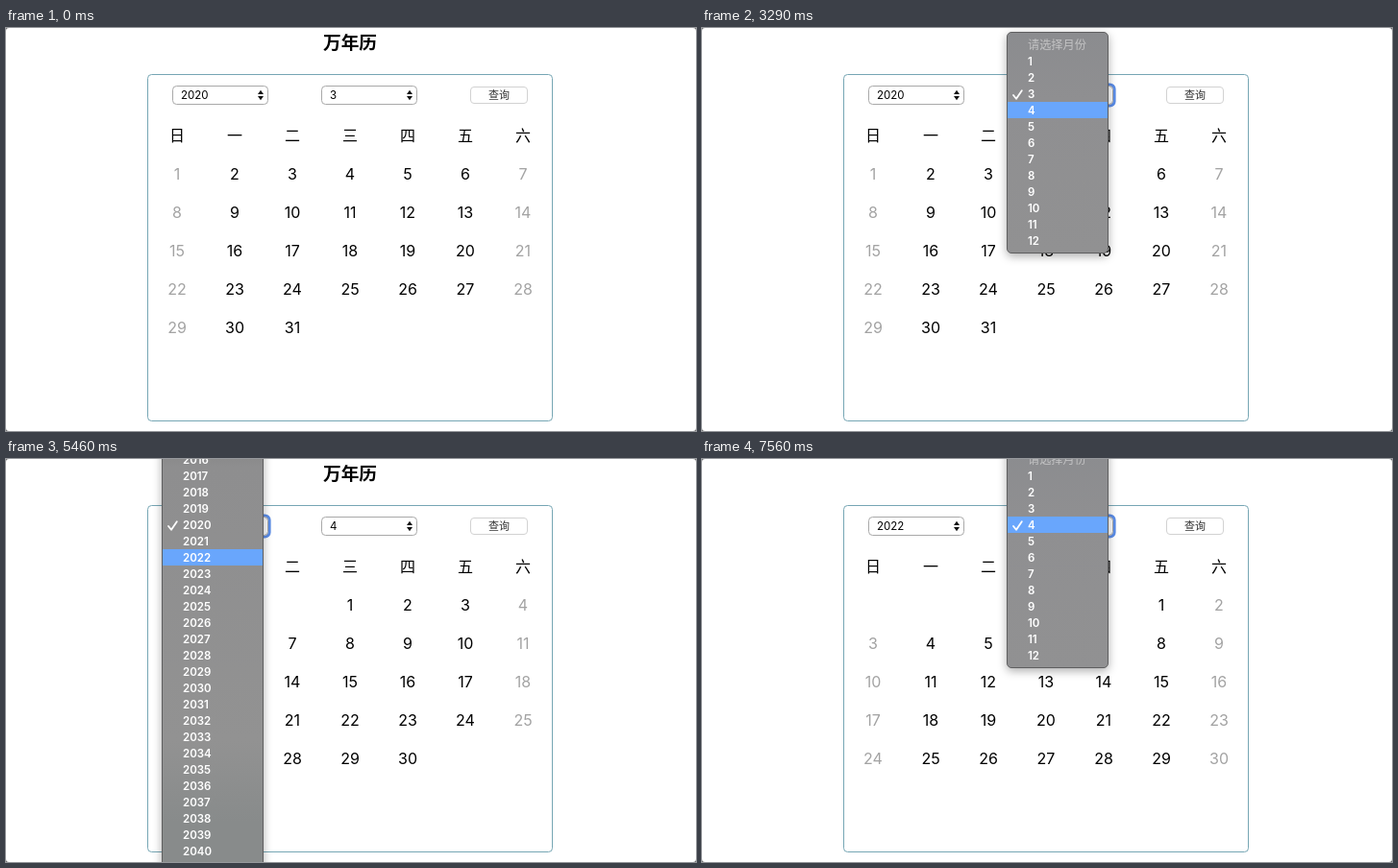
These frames come from a looping animation (718 by 420 pixels, 8000 ms). An HTML page:

```html
<!DOCTYPE html>
<html lang="zh">
<head>
<meta charset="utf-8">
<title>万年历</title>
<style>
  html, body { margin: 0; width: 100%; height: 100%; overflow: hidden; background: #fff; }
  svg { display: block; width: 718px; height: 420px; }
  text { font-family: Inter, "Noto Sans CJK SC", "Noto Sans CJK", sans-serif; white-space: pre; }
  .mid { text-anchor: middle; }
  .shadow { filter: drop-shadow(0 3px 5px rgba(0, 0, 0, .32)); }
</style>
</head>
<body>
<svg id="stage" viewBox="0 0 718 420">
  <defs>
    <linearGradient id="monthFill" x1="0" y1="0" x2="0" y2="1">
      <stop offset="0" stop-color="#8b8c8f"/><stop offset=".3" stop-color="#8f8f91"/><stop offset="1" stop-color="#919192"/>
    </linearGradient>
    <linearGradient id="yearFill" gradientUnits="userSpaceOnUse" x1="0" y1="0" x2="0" y2="420">
      <stop offset="0" stop-color="#7c7c7c"/><stop offset=".12" stop-color="#8e8e8f"/>
      <stop offset=".8" stop-color="#929292"/><stop offset="1" stop-color="#888b8b"/>
    </linearGradient>
    <linearGradient id="pressFill" x1="0" y1="0" x2="0" y2="1">
      <stop offset="0" stop-color="#64a9f8"/><stop offset="1" stop-color="#1f70f0"/>
    </linearGradient>
    <filter id="soft" x="-10%" y="-50%" width="120%" height="200%"><feGaussianBlur stdDeviation=".7"/></filter>
  </defs>
</svg>
<script>
const LOOP = 8000, ROW = 17, SELECTED_TOP = 60;
const stage = document.getElementById('stage');

function add(parent, tag, attrs, content) {
  const node = document.createElementNS('http://www.w3.org/2000/svg', tag);
  for (const key in attrs) node.setAttribute(key, attrs[key]);
  if (content !== undefined) node.textContent = content;
  parent.appendChild(node);
  return node;
}
const show = (node, on) => node.setAttribute('visibility', on ? 'visible' : 'hidden');

// Page
add(stage, 'rect', { width: 718, height: 420, fill: '#fff' });
add(stage, 'path', { d: 'M0 0H3Q0 0 0 3ZM718 0H715Q718 0 718 3ZM0 420H3Q0 420 0 417ZM718 420H715Q718 420 718 417Z', fill: '#666' });
add(stage, 'text', { class: 'mid', x: 358, y: 22, 'font-size': 18.72, 'font-weight': 700 }, '万年历');
add(stage, 'rect', { x: 147.5, y: 48.5, width: 421, height: 361, rx: 4, fill: 'none', stroke: '#76a6b4' });

function makeSelect(x) {
  const ring = add(stage, 'rect', { x: x - 1, y: 59, width: 102, height: 22, rx: 4.5, fill: 'none', stroke: '#5b8de8', 'stroke-width': 3.2, filter: 'url(#soft)' });
  add(stage, 'rect', { x: x + .5, y: 60.5, width: 99, height: 19, rx: 4, fill: '#fff', stroke: '#a9a9a9' });
  const value = add(stage, 'text', { x: x + 9, y: 74, 'font-size': 11.5 });
  const a = x + 92;
  add(stage, 'path', { d: `M${a - 3} 69L${a} 64.8L${a + 3} 69ZM${a - 3} 71L${a} 75.2L${a + 3} 71Z`, fill: '#111' });
  return { ring, value };
}
const yearSelect = makeSelect(173), monthSelect = makeSelect(328);

const button = add(stage, 'rect', { x: 483.5, y: 61.5, width: 59, height: 17, rx: 3.5 });
const buttonText = add(stage, 'text', { class: 'mid', x: 513, y: 74, 'font-size': 11 }, '查询');

// Calendar
[...'日一二三四五六'].forEach((name, i) =>
  add(stage, 'text', { class: 'mid', x: 178 + 60 * i, y: 118, 'font-size': 16 }, name));

const cells = Array.from({ length: 42 }, (_, i) => add(stage, 'text', {
  class: 'mid', x: 178 + 60 * (i % 7), y: 158 + 40 * Math.floor(i / 7), 'font-size': 16,
  fill: i % 7 % 6 ? '#000' : '#a3a3a3'
}));

function fillCalendar(year, month) {
  const first = new Date(year, month - 1, 1).getDay();
  const count = new Date(year, month, 0).getDate();
  cells.forEach((cell, i) => {
    const day = i - first + 1;
    cell.textContent = day > 0 && day <= count ? day : '';
  });
}

// Popup menus: rows are placed so that the checked item covers its select box
function makeMenu(x, labels, fill) {
  const group = add(stage, 'g', { class: 'shadow' });
  const list = add(group, 'g', {});
  add(list, 'rect', { x: x + .5, y: -4.5, width: 105, height: labels.length * ROW + 9, rx: 4.5, fill, stroke: '#5f5f60' });
  const bar = add(list, 'rect', { x: x + 1, width: 104, height: ROW, fill: '#69a6fc' });
  labels.forEach((label, i) => {
    const hint = isNaN(label);
    add(list, 'text', {
      x: x + 22, y: i * ROW + 13, 'font-size': hint ? 12.2 : 11.5,
      'font-weight': hint ? 400 : 600, fill: hint ? '#c2c2c3' : '#fff'
    }, label);
  });
  add(group, 'path', { d: `M${x + 7} 70L${x + 10} 73.7L${x + 15.8} 65.3`, fill: 'none', stroke: '#fff', 'stroke-width': 1.8, 'stroke-linecap': 'round', 'stroke-linejoin': 'round' });
  return (alpha, checked, hover) => {
    show(group, alpha > 0);
    group.setAttribute('opacity', alpha);
    list.setAttribute('transform', `translate(0 ${SELECTED_TOP - checked * ROW})`);
    bar.setAttribute('y', hover * ROW);
    bar.setAttribute('opacity', hover < 0 ? 0 : 1);
  };
}
const FIRST_YEAR = 2014;
const years = Array.from({ length: 30 }, (_, i) => FIRST_YEAR + i);
const months = ['请选择月份', ...Array.from({ length: 12 }, (_, i) => i + 1)];
const setYearMenu = makeMenu(162, years, 'url(#yearFill)');
const setMonthMenu = makeMenu(317, months, 'url(#monthFill)');

const within = (t, from, to) => t >= from && t < to;

// Fade-out runs in 70 ms steps after the picked row has blinked
function menuAlpha(t, open, fadeStart, steps) {
  if (t < open) return 0;
  if (t < fadeStart) return 1;
  return steps[Math.floor((t - fadeStart) / 70)] || 0;
}

function render(t) {
  const year = t < 6300 ? 2020 : 2022;
  const month = t < 3640 ? 3 : 4;
  yearSelect.value.textContent = year;
  monthSelect.value.textContent = month;
  show(yearSelect.ring, within(t, 4970, 6650));
  show(monthSelect.ring, within(t, 2450, 3850) || t >= 7490);

  const pressed = within(t, 3850, 3990) || within(t, 6650, 6720);
  button.setAttribute('fill', pressed ? 'url(#pressFill)' : '#fff');
  button.setAttribute('stroke', pressed ? '#4a8ff0' : '#d2d2d2');
  buttonText.setAttribute('fill', pressed ? '#fff' : '#333');

  fillCalendar(t < 6720 ? 2020 : 2022, t < 3990 ? 3 : 4);

  const yearHover = within(t, 5810, 5880) ? -1 : (t < 5320 ? 2020 : t < 5460 ? 2021 : 2022) - FIRST_YEAR;
  setYearMenu(menuAlpha(t, 4970, 5950, [.95, .8, .56, .3, .1].slice(0, 5)), 2020 - FIRST_YEAR, yearHover);

  const monthHover = within(t, 3220, 3290) ? -1 : t < 2800 ? 3 : 4;
  const monthAlpha = t >= 7490 ? 1 : menuAlpha(t, 2450, 3360, [.85, .48, .18, .05]);
  setMonthMenu(monthAlpha, month, monthHover);
}

function tick() {
  render(performance.now() % LOOP);
  requestAnimationFrame(tick);
}
tick();
</script>
</body>
</html>
```
